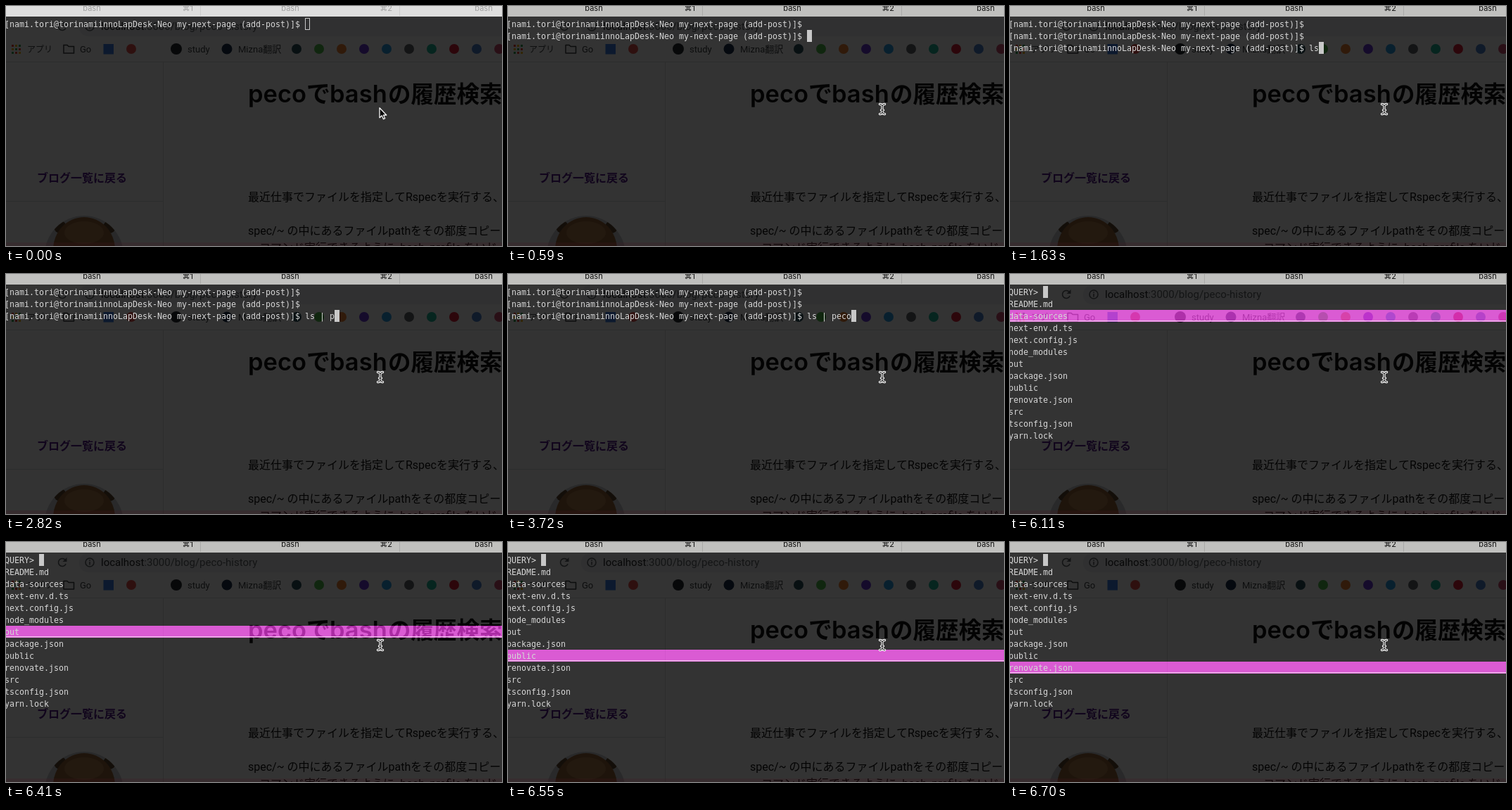
These frames come from a looping animation (705x341 px, 8 s). An HTML page with a canvas:

```html
<!DOCTYPE html>
<html lang="ja">
<head>
<meta charset="utf-8">
<style>
  html, body { margin: 0; width: 100%; height: 100%; overflow: hidden; background: #333; }
  canvas { display: block; }
</style>
</head>
<body>
<canvas id="stage" width="705" height="341"></canvas>
<script>
const ctx = document.getElementById('stage').getContext('2d');
const LOOP = 8000, COL = 7, ROW = 17, LEFT = -2, TOP = 17;
const MONO = '11.63px "DejaVu Sans Mono", monospace';
const UI = 'Roboto, "Noto Sans CJK JP", "Noto Sans CJK", sans-serif';
const CJK = '"Noto Sans CJK JP", "Noto Sans CJK", sans-serif';
const TAB = 'Inter, "DejaVu Sans", sans-serif';
const PROMPT = '[nami.tori@torinamiinnoLapDesk-Neo my-next-page (add-post)]$ ';
const FILES = ['README.md', 'data-sources', 'next-env.d.ts', 'next.config.js', 'node_modules', 'out',
  'package.json', 'public', 'renovate.json', 'src', 'tsconfig.json', 'yarn.lock'];

// [start time, value] steps
const TYPED = [[0, ''], [1630, 'ls'], [1930, 'ls '], [2230, 'ls |'], [2520, 'ls | '],
  [2820, 'ls | p'], [2970, 'ls | pe'], [3120, 'ls | pec'], [3720, 'ls | peco']];
const SELECTED = [[4760, 0], [6110, 1], [6410, 5], [6550, 7], [6700, 8]];
const FOCUS = 290, ENTER = 590, ENTER_AGAIN = 740, THIRD_PROMPT = 880, LIST = 4760;

const stepAt = (steps, t) => steps.filter(([start]) => start <= t).pop()[1];

function rect(x, y, w, h, color) {
  ctx.fillStyle = color;
  ctx.fillRect(x, y, w, h);
}

function ellipse(x, y, rx, ry, color) {
  ctx.fillStyle = color;
  ctx.beginPath();
  ctx.ellipse(x, y, rx, ry, 0, 0, 7);
  ctx.fill();
}

const circle = (x, y, r, color) => ellipse(x, y, r, r, color);

function text(str, x, y, font, color, align = 'left') {
  ctx.font = font;
  ctx.fillStyle = color;
  ctx.textAlign = align;
  ctx.fillText(str, x, y);
}

function addressBar() {
  const gray = '#5f6368';
  ctx.fillStyle = '#f1f3f4';
  ctx.beginPath();
  ctx.roundRect(104, 16, 640, 27, 13);
  ctx.fill();

  ctx.strokeStyle = gray;
  ctx.lineWidth = 1.6;
  ctx.beginPath();
  ctx.arc(80, 29, 5.5, 0.5, 5.6);
  ctx.stroke();
  ctx.fillStyle = gray;
  ctx.fill(new Path2D('M86.5 22v6h-6z'));

  ctx.beginPath();
  ctx.arc(119, 29, 6, 0, 7);
  ctx.stroke();
  rect(118.2, 28, 1.6, 4.5, gray);
  rect(118.2, 25.2, 1.6, 1.6, gray);

  const host = 'localhost';
  text(host, 135, 34, '15px ' + UI, '#202124');
  text(':3000/blog/peco-history', 135 + ctx.measureText(host).width, 34, '15px ' + UI, gray);
}

function bookmarks() {
  const ink = '#3c4043';
  const label = (str, x) => text(str, x, 65.5, '13px ' + UI, ink);
  const dots = ['#ea4335', '#fbbc04', '#34a853'];
  for (let i = 0; i < 9; i++) {
    rect(8 + i % 3 * 5, 55 + Math.floor(i / 3) * 5, 3, 3, dots[(i + Math.floor(i / 3)) % 3]);
  }
  text('アプリ', 30, 65.5, '12px ' + CJK, ink);

  ctx.strokeStyle = ink;
  ctx.lineWidth = 1.5;
  ctx.stroke(new Path2D('M82 55.5h5l2 2h7.5v9.5h-14.5z'));
  label('Go', 105);
  rect(138.5, 54, 14.5, 14.5, '#3d7de8');
  circle(178, 61, 7, '#e8524a');
  circle(242, 61, 8, '#24292e');
  label('study', 258);
  circle(314, 61, 7.5, '#1a2f4a');
  label('Mizna翻訳', 330);

  const icons = ['#2a4f5c', '#4fbf4a', '#f08030', '#6a35d8', '#2a9fe8', '#60666a', '#1fb89a', '#dd2038', '#4a80d0', '#d04a70'];
  icons.forEach((color, i) => circle(413 + 32 * i, 61, 7, color));
}

function avatar() {
  ctx.save();
  ctx.beginPath();
  ctx.arc(111, 354, 56, 0, 7);
  ctx.clip();
  rect(50, 290, 120, 60, '#cdd0d2');
  for (const x of [77, 147]) ellipse(x, 314, 9, 9, '#5f452c');
  ellipse(111, 346, 44, 46, '#986439');
  ellipse(111, 322, 28, 16, '#b07c4c');
  ctx.restore();
}

function article() {
  const black = '#111', line = '#dfe1e4', body = '16px ' + UI;
  rect(0, 79, 705, 1, line);
  rect(223, 80, 1, 261, line);
  rect(0, 277, 223, 1, line);
  text('ブログ一覧に戻る', 44, 250, 'bold 16px ' + CJK, '#551a8b');
  avatar();

  text('peco', 344, 137, '600 34.5px ' + TAB, black);
  text('で', 427, 137, 'bold 34px ' + CJK, black);
  text('bash', 460, 137, '600 34.5px ' + TAB, black);
  text('の履歴検索', 543, 137, 'bold 32.5px ' + CJK, black);

  text('最近仕事でファイルを指定してRspecを実行する、', 344, 277, body, black);
  text('spec/~ の中にあるファイルpathをその都度コピー', 344, 325, body, black);
  text('、コマンド実行できるように .bash_profile をいじ', 344, 349, body, black);
}

function page() {
  rect(0, 0, 705, 341, '#fff');
  addressBar();
  bookmarks();
  article();
}

function terminalGlass() {
  rect(0, 0, 705, 341, 'rgba(0,0,0,.8)');
  rect(0, 336, 705, 5, 'rgba(70,20,30,.2)');
}

function tabs(focused) {
  const ink = focused ? '#111' : '#a0a0a0';
  rect(0, 0, 705, 15, focused ? '#c0c0be' : '#dedede');
  for (const x of [276, 559]) rect(x, 0, 1, 14, focused ? '#a9a9a8' : '#cdcdcd');
  for (const x of [122, 404, 679]) text('bash', x, 7, '11px ' + TAB, ink, 'center');
  text('⌘1', 266, 7, '11px ' + TAB, ink, 'right');
  text('⌘2', 549, 7, '11px ' + TAB, ink, 'right');
}

function line(str, row, color = '#d6d6d6') {
  text(str, LEFT, TOP + row * ROW + 13, MONO, color);
}

function caret(col, row, solid = true) {
  const x = LEFT + col * COL, y = TOP + row * ROW;
  if (solid) return rect(x, y, COL, ROW, '#c8c8c8');
  ctx.strokeStyle = '#c8c8c8';
  ctx.lineWidth = 1;
  ctx.strokeRect(x + 0.5, y + 0.5, COL - 1, ROW - 1);
}

function shell(t) {
  const typed = stepAt(TYPED, t);
  const row = t < ENTER ? 0 : t < ENTER_AGAIN ? 1 : 2;
  const waiting = row === 2 && t < THIRD_PROMPT;
  for (let i = 0; i < row; i++) line(PROMPT, i);
  if (!waiting) line(PROMPT + typed, row);
  caret(waiting ? 0 : PROMPT.length + typed.length, row, t >= FOCUS);
}

function fileList(t) {
  const selected = stepAt(SELECTED, t), y = TOP + (selected + 1) * ROW;
  ctx.globalCompositeOperation = 'lighter';
  rect(0, y, 705, ROW, 'rgb(167,40,160)');
  ctx.globalCompositeOperation = 'source-over';
  rect(0, y + 15, 705, 1.3, '#efc0ec');
  line('QUERY>', 0);
  caret(7, 0);
  FILES.forEach((name, i) => line(name, i + 1, i === selected ? '#d3d9d5' : undefined));
}

function pointer(focused) {
  const outline = (d, color, width) => {
    ctx.strokeStyle = color;
    ctx.lineWidth = width;
    ctx.stroke(new Path2D(d));
  };
  ctx.lineJoin = ctx.lineCap = 'round';
  if (focused) {
    const beam = 'M528.5 139.5q3 0 3.5 2.5q.5-2.5 3.5-2.5M532 142v9M528.5 153.5q3 0 3.5-2.5q.5 2.5 3.5 2.5M530.5 148h3';
    outline(beam, '#f6f6f6', 3.4);
    outline(beam, '#111', 1);
  } else {
    const arrow = 'M531 144.7v14l3.2-2.9 2.3 4.9 2.2-1-2.2-4.7h4.3z';
    ctx.fillStyle = '#080808';
    ctx.fill(new Path2D(arrow));
    outline(arrow, '#f6f6f6', 1.3);
  }
}

function draw(now) {
  const t = now % LOOP, focused = t >= FOCUS;
  page();
  terminalGlass();
  tabs(focused);
  if (t < LIST) shell(t);
  else fileList(t);
  pointer(focused);
  requestAnimationFrame(draw);
}
requestAnimationFrame(draw);
</script>
</body>
</html>
```
